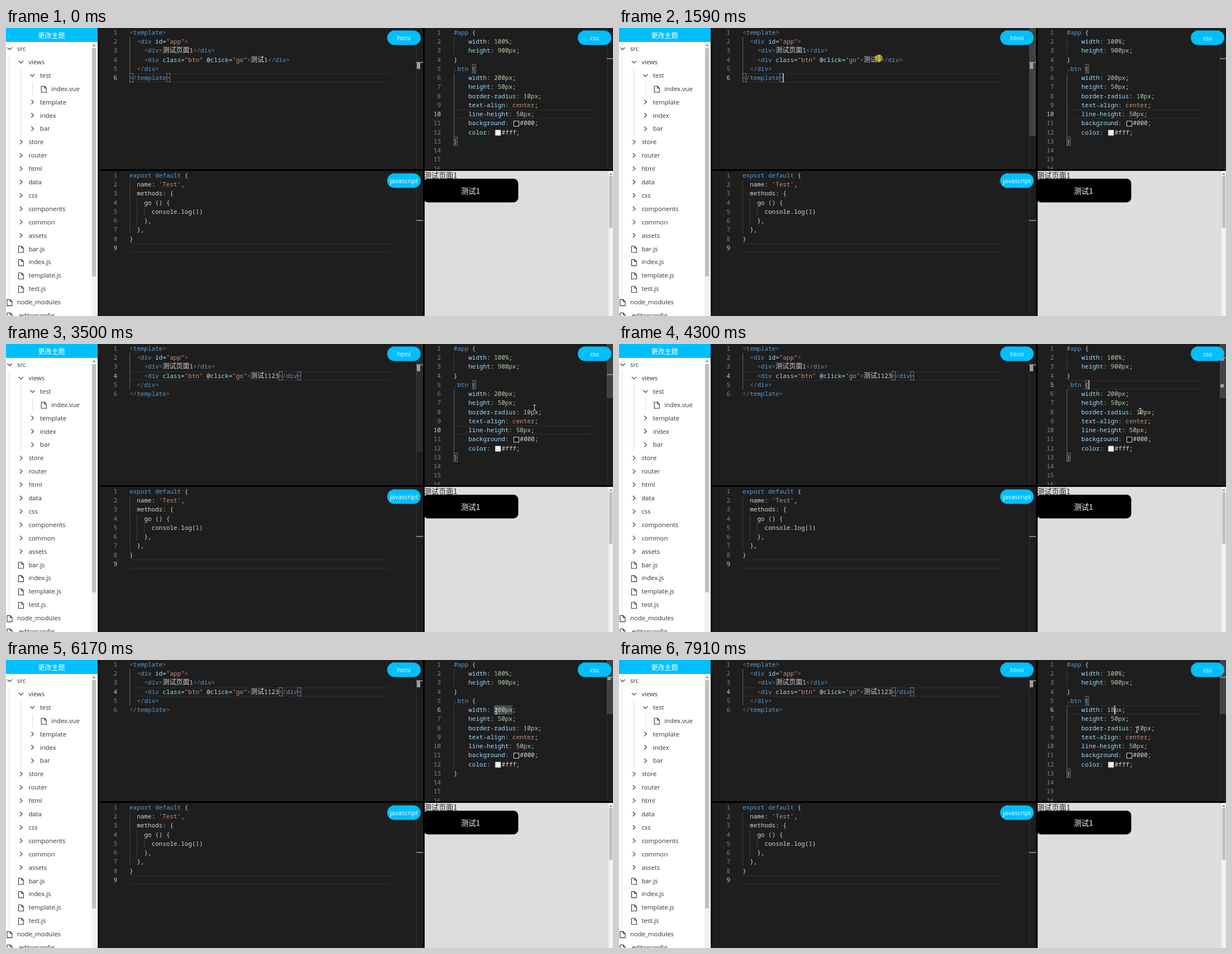
These frames come from a looping animation (1086 px wide and 516 px high, 8000 ms). An HTML page with a canvas:

```html
<!DOCTYPE html>
<html lang="zh">
<head>
<meta charset="utf-8">
<style>
  html, body { margin: 0; width: 100%; height: 100%; overflow: hidden; background: #000; }
  canvas { display: block; }
</style>
</head>
<body>
<canvas id="stage" width="1086" height="516"></canvas>
<script>
const ctx = document.getElementById('stage').getContext('2d');
const LOOP = 8000, ROW = 16.24, CHAR = 6.57, CJK = 12;
const SANS = '"Open Sans", "Noto Sans CJK SC", "Noto Sans CJK", sans-serif';
const HAN = '"Noto Sans CJK SC", "Noto Sans CJK", sans-serif';
const MONO = '10.95px "Noto Sans Mono", "DejaVu Sans Mono", monospace';
const COLORS = { tag: '#569cd6', attr: '#9cdcfe', str: '#ce9178', num: '#b5cea8', punct: '#808080' };
const SYNTAX = {
  html: /(?<punct><\/?|>)|(?<str>"[^"]*")|(?<tag>template|div)|(?<attr>\b(id|class|click)\b)|[^]/g,
  js: /(?<str>'[^']*')|(?<tag>export|default)|(?<num>\d+)|[^]/g,
  css: /(?<tag>[#.]\w+(?= \{))|#\w+|(?<attr>[\w-]+(?=:))|(?<num>\d+(px|%))|(?<str>center|px)|[^]/g
};

const TREE = [
  [0, 'src', 'open'], [1, 'views', 'open'], [2, 'test', 'open'], [3, 'index.vue', 'file'],
  ...['template', 'index', 'bar'].map(n => [2, n, 'shut']),
  ...['store', 'router', 'html', 'data', 'css', 'components', 'common', 'assets'].map(n => [1, n, 'shut']),
  ...['bar.js', 'index.js', 'template.js', 'test.js'].map(n => [1, n, 'file']),
  [0, 'node_modules', 'file'], [0, '.editorconfig', 'file']
];

// time, x, y of the mouse pointer
const PATH = [
  [70, 990, 495], [200, 840, 430], [330, 683, 351], [460, 527, 230], [560, 496, 207],
  [640, 503, 189], [740, 479, 123], [840, 460, 90], [1300, 463, 55], [1660, 466, 54],
  [1970, 514, 178], [2890, 514, 178], [3100, 660, 185], [3300, 850, 200], [3500, 945, 114],
  [3700, 880, 85], [3900, 846, 74], [4080, 846, 74], [4300, 932, 120], [4500, 906, 116],
  [5020, 895, 92], [5480, 895, 92], [5700, 877, 92], [6440, 877, 92], [6690, 926, 125], [LOOP, 926, 125]
];

const between = (t, a, b) => t >= a && t < b;
const clamp = v => Math.max(0, Math.min(1, v));

function rect(x, y, w, h, color) {
  ctx.fillStyle = color;
  ctx.fillRect(x, y, w, h);
}

function outline(x, y, w, h, color) {
  ctx.strokeStyle = color;
  ctx.lineWidth = 1;
  ctx.strokeRect(x + .5, y + .5, w, h);
}

function rounded(x, y, w, h, r, color) {
  ctx.fillStyle = color;
  ctx.beginPath();
  ctx.roundRect(x, y, w, h, r);
  ctx.fill();
}

function label(text, x, y, color, font, align = 'left') {
  ctx.font = font;
  ctx.fillStyle = color;
  ctx.textAlign = align;
  ctx.fillText(text, x, y);
}

function stroke(color, width, ...points) {
  ctx.strokeStyle = color;
  ctx.lineWidth = width;
  ctx.beginPath();
  points.forEach(([x, y]) => ctx.lineTo(x, y));
  ctx.stroke();
}

const isHan = ch => ch > '\u2e80';
const charWidth = ch => ch === '■' ? 13.5 : isHan(ch) ? CJK : CHAR;
const textWidth = text => [...text].reduce((sum, ch) => sum + charWidth(ch), 0);

function codeLine(text, x, y, lang) {
  for (const { 0: token, index, groups } of text.matchAll(SYNTAX[lang])) {
    const kind = Object.keys(groups).find(k => groups[k]);
    const left = x + textWidth(text.slice(0, index));
    if (token === '■') {
      rect(left + 2, y - 8, 10, 10, '#eee');
      if (text.includes('#000')) rect(left + 3, y - 7, 8, 8, '#000');
    } else {
      const font = isHan(token) ? `12px ${HAN}` : MONO;
      label(token, left, y, COLORS[kind] || '#d4d4d4', font);
    }
  }
}

function pill(text, x, y) {
  rounded(x, y, 60, 26, 13, '#00bfff');
  label(text, x + 30, y + 17.5, '#fff', `11.3px ${SANS}`, 'center');
}

function editor(e) {
  const { x, y, w, h, textX, lines, lang } = e;
  const rowY = n => y + (n - 1) * ROW;
  const colX = (n, col) => textX + textWidth(lines[n - 1].slice(0, col));
  ctx.save();
  ctx.beginPath();
  ctx.rect(x, y, w, h);
  ctx.clip();
  rect(x, y, w, h, '#1e1e1e');

  if (e.highlight) {
    const top = Math.round(rowY(e.active));
    rect(textX, top, e.lineWidth, 1.5, '#2a2a2a');
    rect(textX, top + 15, e.lineWidth, 1.5, '#2a2a2a');
  }
  for (const [col, from, to, lit] of e.guides)
    rect(Math.round(textX + col * CHAR), rowY(from), 1, (to - from + 1) * ROW, lit ? '#686868' : '#404040');
  for (const [n, from, to, color] of e.marks || [])
    rect(colX(n, from), rowY(n), colX(n, to) - colX(n, from), ROW, color);
  for (const [n, col] of e.brackets || [])
    outline(Math.round(colX(n, col)), Math.round(rowY(n)), 6, 15, '#777');

  for (let n = 1; n <= (e.numbered || lines.length); n++) {
    label(n, e.numberX, rowY(n) + 12, n === e.active ? '#d0d0d0' : '#858585', MONO, 'right');
    codeLine(lines[n - 1] || '', textX, rowY(n) + 12, lang);
  }
  if (e.caret) rect(Math.round(colX(...e.caret)), rowY(e.caret[0]), 1.5, ROW, '#d8d8d8');

  // overview ruler, scroll thumb and minimap
  const ruler = x + w - e.rulerWidth;
  rect(ruler, y, 1, h, '#303030');
  if (e.slider) rect(ruler, y, e.rulerWidth, e.sliderHeight, `rgba(121,121,121,${.4 * e.slider})`);
  for (const n of e.rulerMarks || [])
    rect(ruler + 1, y + (n - 1) * e.rulerStep, 6, e.rulerStep, '#a0a0a0');
  rect(ruler, e.rulerY ?? y + (e.active - 1) * e.rulerStep, e.rulerWidth, 1.5, '#a0a0a0');
  stroke('#47606f', 1, [e.pillX + 10, y + 4], [e.pillX + 15, y + 5], [e.pillX + 18, y + 8]);
  pill(e.title, e.pillX, y + 4.5);
  ctx.restore();
}

function scrollbar(x, w, top, thumbY, thumbH) {
  rect(x, top, w, 516 - top, '#f1f1f1');
  rect(x + 1, thumbY, w - 2, thumbH, '#c1c1c1');
  const mid = x + w / 2;
  ctx.fillStyle = '#777';
  ctx.beginPath();
  ctx.moveTo(mid - 2.5, top + 7);
  ctx.lineTo(mid, top + 4);
  ctx.lineTo(mid + 2.5, top + 7);
  ctx.fill();
}

function sidebar() {
  rect(0, 0, 164, 516, '#fff');
  rect(5, 49, 1, 431, '#ddd');
  rect(26, 72, 1, 120, '#ddd');
  rect(47, 97, 1, 23, '#ddd');
  TREE.forEach(([depth, name, kind], i) => {
    const x = 6.5 + depth * 20.4, y = 37 + i * 23.9;
    if (kind === 'file') {
      stroke('#333', 1.1, [x + 1, y - 4.5], [x - 4.5, y - 4.5], [x - 4.5, y + 6.5],
        [x + 4.5, y + 6.5], [x + 4.5, y - 1], [x + 1, y - 4.5], [x + 1, y - 1], [x + 4.5, y - 1]);
    } else if (kind === 'open') {
      stroke('#333', 1.2, [x - 4, y - 2], [x, y + 2], [x + 4, y - 2]);
    } else {
      stroke('#333', 1.2, [x - 2, y - 4], [x + 2, y], [x - 2, y + 4]);
    }
    label(name, 20 + depth * 20.4, y + 4, '#333', `11.3px ${SANS}`);
  });
  scrollbar(153, 9, 25, 36, 409);
  rect(0, 0, 164, 25, '#00bfff');
  label('更改主题', 81.5, 17.5, '#fff', `12px ${HAN}`, 'center');
}

function preview() {
  rect(749, 256, 337, 260, '#ddd');
  label('测试页面1', 748, 268.5, '#222', `13.1px ${HAN}`);
  rounded(746.5, 270, 170, 42.5, 8.5, '#000');
  label('测试1', 831, 296.5, '#fff', `13.4px ${HAN}`, 'center');
  scrollbar(1078, 8, 256, 265, 93);
}

function pointer(t) {
  if (t < PATH[0][0]) return;
  const i = PATH.findIndex(p => p[0] > t);
  const [t0, x0, y0] = PATH[i - 1], [t1, x1, y1] = PATH[i];
  const k = (t - t0) / (t1 - t0);
  const x = Math.round(x0 + (x1 - x0) * k), y = Math.round(y0 + (y1 - y0) * k);
  if (between(t, 1540, 1660) || between(t, 3900, 4020) || between(t, 5220, 5290)) {
    ctx.fillStyle = 'rgba(205,190,0,.8)';
    ctx.beginPath();
    ctx.arc(x, y, 6.5, 0, 7);
    ctx.fill();
  }
  if (x > 749 && y > 256) {
    ctx.fillStyle = '#fff';
    ctx.beginPath();
    [[0, 0], [0, 12], [3, 9], [7, 9]].forEach(([dx, dy]) => ctx.lineTo(x + dx, y + dy));
    ctx.closePath();
    ctx.fill();
    ctx.strokeStyle = '#000';
    ctx.lineWidth = 1;
    ctx.stroke();
    return;
  }
  rect(x, y - 4, 1, 9, '#ccc');
  rect(x - 2, y - 5, 5, 1, '#ccc');
  rect(x - 2, y + 4, 5, 1, '#ccc');
}

function htmlEditor(t) {
  const typed = t < 2110 ? '1' : t < 2430 ? '11' : t < 2570 ? '112' : '1123';
  const line4 = `    <div class="btn" @click="go">测试${typed}</div>`;
  const closing = line4.lastIndexOf('<');
  const active = t < 1660 ? 6 : 4, matched = t < 2170 ? 6 : 4;
  editor({
    x: 167, y: 0, w: 579, h: 253, textX: 221, numberX: 199, lineWidth: 467, lang: 'html',
    lines: ['<template>', '  <div id="app">', '    <div>测试页面1</div>', line4, '  </div>', '</template>'],
    active, highlight: true, guides: [[0, 2, 5, true]],
    brackets: matched === 6 ? [[6, 0], [6, 10]] : [[4, closing], [4, line4.length - 1]],
    caret: between(t, 1540, 1660) ? [6, 11] : between(t, 1660, 3130) ? [4, closing] : null,
    rulerWidth: 12, rulerStep: 12.2, rulerMarks: [matched],
    slider: t < 2900 ? clamp((t - 450) / 100) : clamp((3800 - t) / 800), sliderHeight: 194,
    title: 'html', pillX: 682
  });
}

function jsEditor() {
  editor({
    x: 167, y: 256, w: 579, h: 260, textX: 221, numberX: 199, lineWidth: 467, lang: 'js',
    lines: ['export default {', "  name: 'Test',", '  methods: {', '    go () {',
      '      console.log(1)', '    },', '  },', '}', ''],
    active: 9, highlight: true, guides: [[0, 2, 7], [2, 4, 6], [4, 5, 5]],
    rulerWidth: 12, rulerStep: 11, rulerY: 344, title: 'javascript', pillX: 682
  });
}

function cssEditor(t) {
  const value = t < 6440 ? '200' : t < 7640 ? '' : t < 7860 ? '1' : '18';
  const active = t < 3960 ? 10 : t < 5220 ? 5 : 6;
  const matched = t < 5480 || t >= 7640;
  const selecting = between(t, 5480, 6440);
  const selectedFrom = 13 - Math.min(2, Math.floor((t - 5480) / 73));
  let caret = null;
  if (between(t, 3960, 4570) || between(t, 5020, 5220)) caret = [5, 6];
  else if (between(t, 5220, 5480)) caret = [6, 14];
  else if (between(t, 6440, 7170) || t >= 7640) caret = [6, 11 + value.length];
  editor({
    x: 749, y: 0, w: 337, h: 253, textX: 801, numberX: 778, lineWidth: 247, lang: 'css',
    lines: ['#app {', '    width: 100%;', '    height: 900px;', '}', '.btn {', `    width: ${value}px;`,
      '    height: 50px;', '    border-radius: 10px;', '    text-align: center;',
      '    line-height: 50px;', '    background: ■#000;', '    color: ■#fff;', '}'],
    numbered: 16, active, highlight: matched, caret,
    guides: [[0, 2, 3], [0, 6, 12, matched]],
    marks: selecting ? [[6, 11, 16, '#474747'], [6, selectedFrom, 14, '#4a525b']] : [],
    brackets: matched ? [[5, 5], [13, 0]] : [],
    rulerWidth: 11, rulerStep: 6,
    rulerMarks: between(t, 3960, 5220) ? [5, 13] : selecting ? [6] : [],
    slider: clamp((t - 3200) / 100), sliderHeight: 97,
    title: 'css', pillX: 1023
  });
}

function draw() {
  const t = performance.now() % LOOP;
  rect(0, 0, 1086, 516, '#000');
  sidebar();
  preview();
  htmlEditor(t);
  jsEditor();
  cssEditor(t);
  pointer(t);
  requestAnimationFrame(draw);
}
draw();
</script>
</body>
</html>
```
